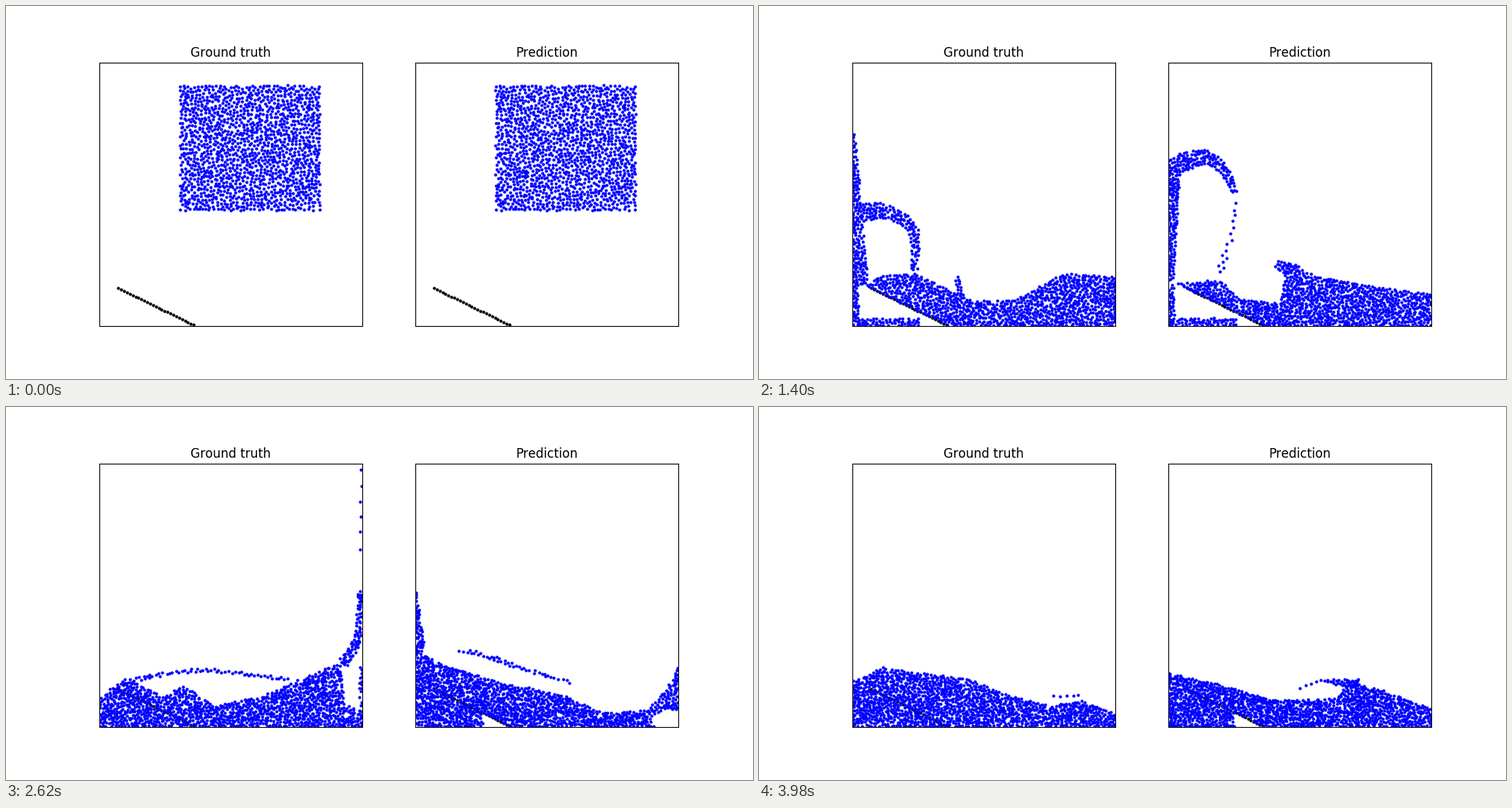
A matplotlib script that plays this animation: 1000 px wide and 500 px high, repeating every 4 s.

```python
import numpy as np
import matplotlib.pyplot as plt
from matplotlib.animation import FuncAnimation

N = 1450                      # water particles per panel
FRAMES, STEP = 200, 20
SIZE = 352.27                 # panel side in pixels, origin at its lower left
RAMP = np.array([[25.2, 50.4], [126.2, 1.2]])
DENSITY = 0.24                # candidate points per square pixel

plt.rcParams["text.kerning_factor"] = 6
rng = np.random.default_rng(5)


# ---- clouds of candidate points: columns x, y, gap, tag ----

def cloud(xy, gap=1.0, tag=0):
    return np.c_[xy, np.full(len(xy), gap), np.full(len(xy), tag)]


def box(x0, x1, y0, y1):
    n = int(DENSITY * (x1 - x0) * (y1 - y0))
    return cloud(rng.uniform((x0, y0), (x1, y1), (n, 2)))


def wave(*surface):
    """Water from the floor up to a surface line."""
    x, y = np.reshape(surface, (-1, 2)).T
    c = box(x[0], x[-1], 0, y.max())
    return c[c[:, 1] < np.interp(c[:, 0], x, y)]


def smooth(p, n=10):
    """Catmull-Rom curve through the points."""
    q = np.vstack([2 * p[0] - p[1], p, 2 * p[-1] - p[-2]])
    s = np.linspace(0, len(p) - 1, n * (len(p) - 1) + 1)
    k = np.minimum(s.astype(int), len(p) - 2)
    u = (s - k)[:, None]
    a, b, c, d = (q[k + i] for i in range(4))
    return b + u / 2 * (c - a + u * (2 * a - 5 * b + 4 * c - d
                                     + u * (3 * (b - c) + d - a)))


def jet(w0, w1, *xy, gap=1.0, tag=0):
    """Stream along a curve, its width going from w0 to w1."""
    p = smooth(np.reshape(xy, (-1, 2)).astype(float))
    d = np.diff(p, axis=0)
    length = np.hypot(*d.T)
    width = np.linspace(w0, w1, len(d))
    area = length * np.maximum(width, 2.5)
    n = int(DENSITY * area.sum()) + 8
    k = rng.choice(len(d), n, p=area / area.sum())
    normal = np.c_[-d[k, 1], d[k, 0]] / length[k, None]
    off = width[k] * rng.uniform(-.5, .5, n)
    return cloud(p[k] + d[k] * rng.random((n, 1)) + normal * off[:, None], gap, tag)


def pose(t, *parts, dry=None, hole=None):
    """dry: span of empty space below the ramp; hole: ellipse x, y, rx, ry."""
    c = np.vstack(parts)
    x, y = c[:, 0], c[:, 1]
    keep = (x > 0) & (x < SIZE) & (y > 0) & (y < SIZE)
    if dry:
        (x0, y0), (x1, y1) = RAMP
        below = y < y0 + (x - x0) * (y1 - y0) / (x1 - x0)
        keep &= ~(below & (x > dry[0]) & (x < dry[1]) & ((y > 10) | (x > 90)))
    if hole:
        hx, hy, rx, ry = hole
        keep &= ((x - hx) / rx) ** 2 + ((y - hy) / ry) ** 2 > 1
    return t, spread(c[keep])


def spread(c):
    """Pick N evenly spaced points, farthest first; columns x, y, layer."""
    x, y, gap, tag = c.T.copy()
    dist = np.full(len(c), 1e9)
    picks = []
    for _ in range(N):
        k = dist.argmax()
        picks.append(k)
        np.minimum(dist, ((x - x[k]) ** 2 + (y - y[k]) ** 2) / gap ** 2, out=dist)
    xy = c[picks, :2] + rng.normal(0, .4, (N, 2))
    return np.c_[xy.clip(1, SIZE - 1.2), 300 * tag[picks]]


# ---- pairing particles between two poses ----

def halve(p, idx, axis=0):
    """Order points by repeated median cuts."""
    if len(idx) < 2:
        return list(idx)
    idx = idx[np.argsort(p[idx, axis])]
    m = len(idx) // 2
    return halve(p, idx[:m], 1 - axis) + halve(p, idx[m:], 1 - axis)


def pair(a, b):
    """Reorder b so that each row is a short move from the same row of a."""
    every = np.arange(N)
    out = np.empty_like(b)
    out[halve(a, every)] = b[halve(b, every)]
    for _ in range(1400):
        i, j = rng.permutation(N).reshape(2, -1)
        crossed = ((a[i] - a[j]) * (out[i] - out[j])).sum(1) < 0
        i, j = i[crossed], j[crossed]
        out[i], out[j] = out[j], out[i]
    return out


class Flow:
    """Smooth particle paths through a list of poses."""

    def __init__(self, poses):
        self.t = [t for t, _ in poses]
        keys = [poses[0][1]]
        for _, points in poses[1:]:
            keys.append(pair(keys[-1], points))
        self.p = np.array(keys)[:, :, :2]
        s = np.diff(self.p, axis=0) / np.diff(self.t)[:, None, None]
        a, b = s[:-1], s[1:]
        same = a * b > 0
        mid = np.where(same, 2 * a * b / np.where(same, a + b, 1), 0)
        self.v = np.concatenate([s[:1], mid, s[-1:]])

    def at(self, t):
        k = int(np.clip(np.searchsorted(self.t, t, "right") - 1, 0, len(self.t) - 2))
        h = self.t[k + 1] - self.t[k]
        u = (t - self.t[k]) / h
        p, v = self.p, self.v
        return ((1 + 2 * u) * (1 - u) ** 2 * p[k] + u * (1 - u) ** 2 * h * v[k]
                + u * u * (3 - 2 * u) * p[k + 1] + u * u * (u - 1) * h * v[k + 1])


# the block flies up into the corner, then sheets off the ceiling and the wall
start = [
    pose(0, box(108, 295, 155, 322)),
    pose(260, jet(8, 210, 2, 350, 150, 335, 300, 230)),
    pose(540, wave(250, 8, 300, 25, 315, 200, 352, 235),
         jet(10, 70, 3, 350, 100, 315, 200, 270, 290, 190)),
]

truth = start + [
    pose(860,
         wave(110, 7, 280, 19, 302, 50, 308, 205, 352, 186),
         jet(8, 60, 3, 350, 45, 300, 105, 260, 175, 241, 235, 205, 300, 125),
         jet(5, 22, 185, 296, 196, 255),
         jet(2, 10, 52, 340, 53, 303),
         jet(5, 5, 3, 346, 3, 235, gap=1.6),
         jet(4, 14, 69, 40, 120, 6),
         jet(1, 5, 286, 285, 306, 212, gap=1.7)),
    pose(1400,
         wave(0, 52, 40, 67, 85, 70, 160, 33, 215, 34, 285, 70, 352, 66),
         jet(24, 8, 12, 152, 45, 153, 80, 130, 83, 75, tag=1),
         jet(4, 22, 2, 257, 9, 50),
         jet(4, 7, 139, 68, 145, 40),
         dry=(8, 127)),
    pose(2020,
         wave(0, 50, 25, 56, 80, 30, 130, 12, 165, 12, 178, 40, 290, 75, 352, 55),
         jet(15, 5, 2, 168, 60, 185, 130, 195, 195, 250, 270, 195, 318, 142, 340, 72,
             tag=1),
         jet(18, 10, 6, 165, 6, 0, gap=1.1),
         jet(2, 4, 351, 205, 351, 70, gap=2),
         dry=(10, 62), hole=(192, 18, 12, 14)),
    pose(2620,
         wave(0, 38, 35, 66, 85, 40, 112, 55, 155, 27, 220, 42, 322, 86, 328, 28,
              352, 22),
         jet(5, 14, 349, 182, 344, 115, 325, 85),
         jet(5, 3, 30, 60, 130, 76, 252, 64, gap=1.4),
         jet(4, 6, 350, 80, 350, 20, gap=1.5),
         jet(3, 3, 350, 346, 349, 235, gap=6)),
    pose(3160,
         wave(0, 25, 22, 58, 55, 53, 125, 68, 210, 66, 290, 48, 352, 10),
         jet(3, 3, 350, 292, 349, 155, gap=7)),
    pose(3980,
         wave(0, 62, 40, 79, 160, 63, 200, 45, 260, 29, 310, 34, 352, 18),
         jet(1, 1, 268, 41, 302, 42, gap=2)),
]

prediction = start + [
    pose(860,
         wave(105, 12, 190, 14, 229, 28, 232, 104, 300, 109, 352, 111),
         jet(16, 50, 90, 258, 115, 218, 165, 160, 230, 85),
         jet(10, 32, 45, 283, 82, 268),
         jet(8, 18, 3, 350, 3, 310, 18, 292, gap=1.2),
         jet(8, 22, 30, 44, 120, 8),
         jet(1, 1, 75, 349, 94, 326, gap=3),
         jet(1, 1, 166, 263, 150, 242, gap=3)),
    pose(1400,
         wave(0, 56, 70, 61, 95, 36, 150, 30, 160, 85, 200, 65, 352, 42),
         jet(8, 22, 145, 84, 170, 70),
         jet(26, 7, 2, 212, 45, 226, 72, 212, 90, 178, tag=1),
         jet(1, 10, 92, 180, 84, 120, 68, 70, gap=2.6),
         jet(16, 6, 8, 215, 4, 60),
         dry=(8, 127)),
    pose(2020,
         wave(0, 52, 45, 56, 90, 82, 130, 95, 160, 84, 235, 42, 255, 28, 350, 15),
         jet(14, 3, 3, 225, 25, 245, 87, 260, 145, 240, 190, 195, 225, 150, 229, 90,
             245, 40, gap=1.1, tag=1),
         jet(6, 4, 4, 235, 3, 160, gap=1.3),
         dry=(10, 75), hole=(105, 57, 30, 14)),
    pose(2620,
         wave(0, 104, 30, 86, 110, 60, 200, 42, 250, 19, 310, 22, 335, 48, 352, 80),
         jet(1, 12, 1, 180, 7, 100),
         jet(6, 3, 57, 100, 85, 98, 150, 76, 207, 60, gap=1.4),
         dry=(88, 127), hole=(340, 8, 24, 15)),
    pose(3160,
         wave(0, 24, 20, 64, 87, 85, 120, 78, 145, 50, 240, 17, 290, 17, 312, 74,
              352, 44),
         jet(3, 12, 299, 90, 312, 70),
         dry=(88, 127)),
    pose(3980,
         wave(0, 72, 70, 56, 140, 36, 225, 38, 243, 60, 290, 48, 352, 24),
         jet(3, 12, 203, 63, 255, 57),
         jet(1, 1, 172, 49, 200, 62, gap=2.5),
         dry=(88, 127)),
]

fig, axes = plt.subplots(1, 2, figsize=(10, 5), dpi=100)
panels = []
for ax, title, poses in zip(axes, ("Ground truth", "Prediction"),
                            (truth, prediction)):
    ax.set_title(title)
    ax.set(xlim=(0, SIZE), ylim=(0, SIZE), xticks=[], yticks=[], aspect="equal")
    ax.plot(*np.linspace(*RAMP, 27).T, "o", ms=2, color="black")
    water, = ax.plot([], [], "o", ms=2, color="blue")
    panels.append((water, Flow(poses)))


def update(i):
    for water, flow in panels:
        water.set_data(*flow.at(i * STEP).T)
    return [water for water, _ in panels]


anim = FuncAnimation(fig, update, frames=FRAMES, interval=STEP, repeat=True)
plt.show()
```
